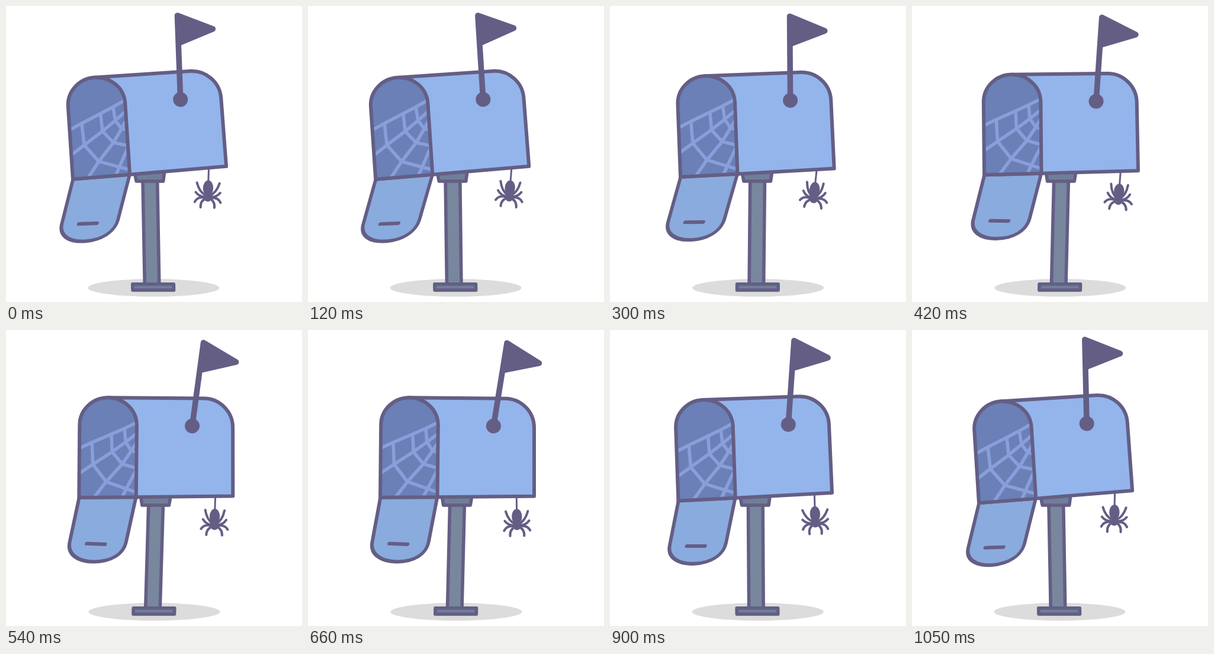
Recreate the animation shown at these times as an HTML page. Size 500 px wide and 500 px high, loop 1080 ms.

```html
<!DOCTYPE html>
<html lang="en">
<head>
<meta charset="utf-8">
<title>Swaying mailbox</title>
<style>
  html, body { margin: 0; width: 100%; height: 100%; overflow: hidden; background: #fff; }
  svg { display: block; width: 100vw; height: 100vh; }
  .line { stroke: #645e85; stroke-width: 6; stroke-linejoin: round; stroke-linecap: round; }
  .metal { fill: #78879d; stroke-width: 5.6; }
  .shade { fill: #6f7f98; }
  .dark { fill: #645e85; }
  .web { fill: none; stroke: #8a9edb; stroke-width: 5.6; stroke-linejoin: round; }
  .legs { fill: none; stroke: #645e85; stroke-width: 4; stroke-linecap: round; }
</style>
</head>
<body>
<svg viewBox="0 0 500 500">
  <defs>
    <path id="front" d="M122 282.5L123.2 160C123.2 134 145.5 114 170.5 114C197.5 114 219.3 134 219.8 160L218.5 282Z"/>
    <clipPath id="inside"><use href="#front"/></clipPath>
    <path id="legs" d="M3-4Q14-9 18.5-25.5M4-2Q14-1 20.5-9.5M3 0Q17-3 22 7M2 0Q13 5 12 16"/>
  </defs>

  <g id="post">
    <ellipse cx="250" cy="476" rx="111" ry="15" fill="#dcdcdc"/>
    <path class="line metal" d="M235.9 292L235 470H259.5L260.6 292Z"/>
    <path class="line metal shade" d="M222 279L225 296H270.5L273 279Z"/>
    <rect class="line metal shade" x="214.5" y="469.8" width="69.5" height="10.2"/>
  </g>

  <g id="spider">
    <path class="line" style="stroke-width:3" d="M0-2V22"/>
    <ellipse class="dark" cy="32.5" rx="8.7" ry="13"/>
    <circle class="dark" cy="48.5" r="6.8"/>
    <g class="legs" transform="translate(0 49)">
      <use id="right" href="#legs"/>
      <use id="left" href="#legs"/>
    </g>
  </g>

  <g id="door">
    <path class="line" fill="#8aabdd" d="M-48 0L-45.5 73C-46 96-23 109 5 109C31 109 51 98 50 75L48 0Z"/>
    <path class="line" d="M-16 78.2L15.4 79.7"/>
  </g>

  <g id="box">
    <path class="line" fill="#93b5ec" d="M170.5 114L333.5 115.5C360.5 116 382 138 382 165V280.5L218.5 282L171 200Z"/>
    <use href="#front" fill="#6a80b6"/>
    <g class="web" clip-path="url(#inside)">
      <path d="M119 201L144 189.5L177 175.5L199 166L224 154"/>
      <path d="M119 244L145.5 226.5L178 205.5L201 189L222 173"/>
      <path d="M144 287L168 256L195 226L209 206L222 186"/>
      <path d="M192 287L205 262L222 230"/>
      <path d="M144 189.5L145.5 226.5L168 256L222 275"/>
      <path d="M177 175.5L178 205.5L195 226L222 234"/>
      <path d="M199 166L201 189L210 203L222 208"/>
    </g>
    <use class="line" href="#front" fill="none"/>
  </g>

  <g id="flag">
    <path class="line dark" style="stroke-width:9.6" d="M0 0V-142L59-117L0-95"/>
    <circle class="dark" r="12.5"/>
  </g>
</svg>
<script>
const LOOP = 1080, STEP = 30, RAD = Math.PI / 180;
const REST_TILT = -0.46;   // tilt at which the box artwork is drawn

const place = (id, transform) =>
  document.getElementById(id).setAttribute("transform", transform);

function draw(time) {
  // One cosine per part, each trailing the post by its own delay.
  const wave = delay => Math.cos(2 * Math.PI * (time - delay) / LOOP);

  const sway = -wave(0), skew = -0.0238 * sway;
  place("post", `matrix(1 0 ${skew} 1 ${0.6 * sway - 475 * skew} 0)`);

  const px = 247.9 + 5.4 * sway, py = 281.7;
  const tilt = -2.67 - 2.3 * wave(66);
  const turn = tilt - REST_TILT;
  const cos = Math.cos(turn * RAD), sin = Math.sin(turn * RAD);
  const onBox = (x, y) => [px + x * cos - y * sin, py + x * sin + y * cos];
  place("box", `translate(${px} ${py}) rotate(${turn}) translate(-252 -281.5)`);

  const lean = (-21 - 4.3 * wave(210)) / 79;
  place("door", `matrix(${cos} ${Math.sin(tilt * RAD)} ${lean} 1 ${onBox(-81.7, 0.7)})`);

  place("flag", `translate(${onBox(61.4, -119.5)}) rotate(${2.8 - 6.4 * wave(120)})`);

  place("spider", `translate(${onBox(100.2, 1)}) rotate(${1.8 + 4.2 * wave(265)})`);
  const lift = 1.8 + 8 * wave(340);
  place("right", `rotate(${-lift})`);
  place("left", `scale(-1 1) rotate(${-lift})`);
}

const start = performance.now();
function tick() {
  const time = (performance.now() - start) % LOOP;
  draw(Math.floor(time / STEP) * STEP);
  requestAnimationFrame(tick);
}
tick();
</script>
</body>
</html>
```
